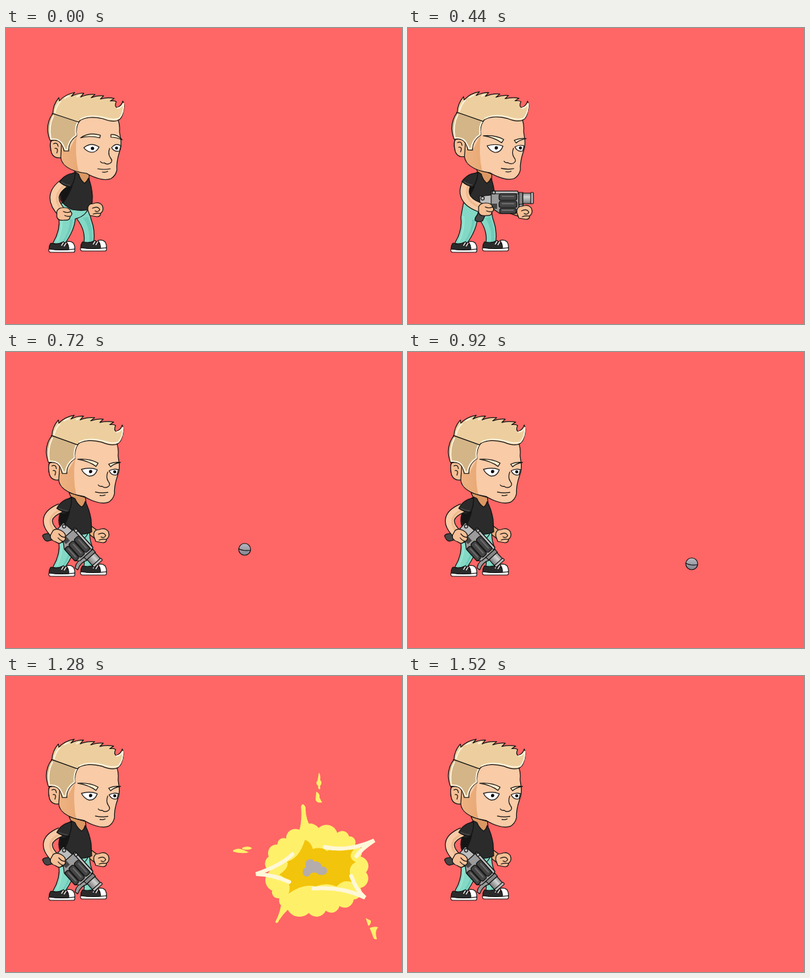
Recreate the animation shown at these times as an HTML page. Size 600 px wide and 450 px high, loop 1560 ms.

```html
<!DOCTYPE html>
<html lang="en">
<head>
<meta charset="utf-8">
<title>Launcher</title>
<style>
  html, body { margin: 0; width: 100%; height: 100%; overflow: hidden; background: #f66; }
  svg { display: block; width: 600px; height: 450px; }
  .ink { stroke: #111; stroke-width: 1.2; stroke-linejoin: round; stroke-linecap: round; }
  .line { fill: none; }
  .skin { fill: #f9cba7; }
  .hand { fill: #f6bf95; }
  .pants { fill: #83d9c6; }
  .cloth { fill: #2b2b2b; }
  .white { fill: #fff; }
  .steel { fill: #9b9b9b; }
  .light { fill: #bdbdbd; }
  .dark { fill: #454545; }
  .flame { fill: #fff06a; }
  .glow { fill: none; stroke: #fff3dc; stroke-width: 2; stroke-linejoin: round; }
</style>
</head>
<body>
<svg viewBox="0 0 600 450">
  <defs>
    <linearGradient id="cheek">
      <stop stop-color="#eeb282"/><stop offset="1" stop-color="#e8a975"/>
    </linearGradient>
    <linearGradient id="metal" x2="0" y2="1">
      <stop stop-color="#b9b9c2"/><stop offset="1" stop-color="#83838f"/>
    </linearGradient>
    <linearGradient id="tube" x2="0" y2="1">
      <stop stop-color="#8a8a8a"/><stop offset=".35" stop-color="#d2d2d2"/><stop offset="1" stop-color="#777"/>
    </linearGradient>
  </defs>

  <path id="smoke" class="white"/>

  <path id="farEdge" class="line" stroke="#111" stroke-width="13"/>
  <path id="farFill" class="line" stroke="#e9ad7e" stroke-width="10.6"/>

  <g id="legs">
    <path class="pants ink" d="M102 268H127Q126 284 130 294Q135 308 133 325Q126 329 118 327Q121 308 108 291Z"/>
    <path d="M124 287Q132 302 131 325L126 327Q128 305 117 289Z" fill="#70cbb9"/>
    <path class="pants ink" d="M84 266H127Q124 286 105 290Q104 307 89 328Q80 331 71 327Q83 307 80 288Z"/>
    <path d="M101 291Q101 306 87 327L83 328Q97 310 97 291Z" fill="#70cbb9"/>
    <path class="line" d="M84 286Q87 305 77 325" stroke="#9ce5d5" stroke-width="2"/>
    <g id="shoe">
      <path class="cloth ink" d="M68 327Q78 330 87 325L98 333L96 338H66Q64 332 68 327Z"/>
      <path class="white ink" d="M91 325Q98 323 102 327Q105 332 104 337L95 338Q96 330 91 325Z"/>
      <path class="white ink" d="M65 336Q84 339 104 336Q105 341 102 341H68Q64 341 65 336Z"/>
      <path class="line" d="M84 331L87 326M88 332L91 327" stroke="#fff" stroke-width="1.4"/>
    </g>
    <use href="#shoe" transform="translate(48 -2)"/>
  </g>

  <g id="torso">
    <path class="ink" fill="#dc9863" d="M102 212L126 222L126 231L118 238L106 224Z"/>
    <path class="cloth ink" d="M96 224L105 219L110 222Q113 232 119 236Q123 233 125 228Q130 240 131 256L130 275Q118 279 100 276Q88 270 83 262Q80 252 86 240Z"/>
    <path d="M86 242Q95 244 101 240Q95 256 87 266Q80 255 86 242Z" fill="#151515"/>
  </g>

  <g id="gun">
    <path class="dark ink" d="M-3 11L10 13L0 34Q-4 37 -11 34Q-13 31 -8 25Z"/>
    <path class="steel ink" d="M56 8L62 8Q57 18 63 29L58 30Q51 21 56 8Z"/>
    <path class="line ink" d="M9 15Q11 24 18 17" stroke-width="2"/>
    <path class="light ink" d="M-5 -3L12 -5L19 -8V17H9L-3 14Z"/>
    <path class="steel ink" d="M13 -11H53L55 -6V17L50 23H26L13 14Z"/>
    <path class="light ink" d="M13 -11H53L55 -7H13Z"/>
    <path class="dark" d="M13 8H22V16H13Z"/>
    <g class="dark ink">
      <rect x="25" y="-7" width="27" height="10" rx="3"/>
      <rect x="25" y="4" width="27" height="10" rx="3"/>
      <rect x="26" y="15" width="25" height="8" rx="3"/>
    </g>
    <path class="line" d="M29 -3H48M29 8H48M29 18H47" stroke="#6c6c6c" stroke-width="2"/>
    <rect class="ink" x="55" y="-9" width="6" height="18" fill="#858585"/>
    <rect class="ink" x="61" y="-8" width="13" height="16" fill="url(#tube)"/>
    <rect class="light ink" x="73" y="-9" width="4" height="17" rx="1"/>
    <g class="light ink"><circle r="2.6"/><circle cx="17" cy="-9" r="2.4"/></g>
  </g>

  <g id="farHand">
    <path class="hand ink" d="M-11 2Q-12 -8 -3 -8Q6 -12 11 -5Q14 3 8 7Q9 11 3 12L-8 10Z"/>
    <path class="line ink" d="M-4 -1Q4 -5 7 1Q5 6 0 3M8 7Q2 6 -3 8"/>
  </g>

  <path id="armEdge" class="line" stroke="#111" stroke-width="15"/>
  <path id="armFill" class="line" stroke="#f9cba7" stroke-width="12.6"/>
  <path id="armTone" class="line" stroke="#efb98d" stroke-width="3" transform="translate(3.5 1)"/>
  <g id="hand">
    <path class="hand ink" d="M-11 -3Q-9 -9 0 -9Q9 -9 10 -3Q14 1 9 5Q9 11 1 10Q-9 12 -11 5Z"/>
    <path class="line ink" d="M-1 -3Q5 0 10 -3M1 3Q5 5 9 4"/>
  </g>
  <g id="sleeve">
    <path class="cloth ink" d="M81 234Q87 225 96 222L105 220Q104 234 98 242Q89 241 81 234Z"/>
    <path class="line" d="M84 234Q91 239 97 239" stroke="#4a4a4a" stroke-width="1.5"/>
  </g>

  <g id="head">
    <path class="skin ink" d="M70 130L168 136Q173 145 172 158L174 170Q175 181 172 188Q167 204 168 216Q166 225 159 229Q151 232 141 229Q130 226 122 221Q103 219 92 211Q84 205 83 197Q72 198 69 189Q66 181 68 171Z"/>
    <path d="M107 164Q104 194 110 218Q96 215 88 207Q83 198 83 186L95 187Z" fill="url(#cheek)"/>
    <path class="hand ink" d="M83 197Q73 199 69 190Q65 173 70 171Q80 169 84 177Z"/>
    <path class="line ink" d="M72 176Q78 173 79 180M74 183Q80 182 77 190"/>
    <path class="ink" fill="#d3b588" d="M71 130Q63 140 63 155Q64 165 67 171Q81 168 85 177L88 187H95Q94 173 107 164Q105 151 111 142Z"/>
    <path class="glow" d="M72 133Q64 149 68 169Q82 167 87 179L90 185H93Q94 171 106 163Q104 150 109 143"/>
    <path class="ink" fill="#edcf9f" d="M71 130Q71 117 80 106L81 111Q89 101 104 98L99 104Q108 99 118 99L113 105Q123 100 135 101L129 106Q139 102 148 103L143 108Q154 105 164 107L158 111Q164 110 167 112Q164 119 168 121Q175 119 177 111Q181 118 177 130Q175 139 168 141Q159 143 147 138Q126 133 113 140L110 143Z"/>
    <path class="glow" d="M74 129Q76 118 83 111M88 107L96 103M107 105L112 102M168 122Q175 121 178 115Q179 128 172 137Q164 141 148 136Q126 131 112 139"/>
    <g id="calm">
      <path class="white ink" d="M118 182Q129 173 141 181Q137 189 130 189Q122 188 118 182Z"/>
      <path class="white ink" d="M160 182Q166 174 174 179L172 187Q164 189 160 182Z"/>
      <path class="ink" fill="#fff0cf" d="M113 167Q126 158 143 163L142 167Q127 163 113 167ZM159 162Q168 161 176 170Q167 166 159 166Z"/>
    </g>
    <g id="angry">
      <path class="white ink" d="M117 180Q130 176 141 180Q138 190 129 190Q121 188 117 180Z"/>
      <path class="white ink" d="M159 181Q166 177 173 179L171 187Q163 189 159 181Z"/>
      <path class="ink" fill="#fff0cf" d="M111 165Q129 163 142 170L139 175Q127 167 111 165ZM158 171Q166 167 176 168Q166 170 161 175Z"/>
    </g>
    <circle cx="131" cy="183" r="2.5"/><circle cx="167.5" cy="182.5" r="2.3"/>
    <path class="line ink" d="M157 183Q154 191 158 197Q163 203 157 206Q152 208 149 205Q145 206 143 203M139 214Q149 216 158 214M146 219Q150 220 154 218"/>
  </g>

  <g id="ball">
    <circle class="ink" r="9" fill="url(#metal)"/>
    <path class="line ink" d="M-9 -1Q-3 3 8.8 1.5"/>
  </g>

  <path id="scraps" class="flame"/>
  <g id="boom">
    <path id="cloud" class="flame"/>
    <path class="flame" d="M444 236Q449 220 447 198Q450 191 454 200Q453 216 464 235ZM418 338Q417 357 408 374Q411 378 414 371Q424 355 442 344Z"/>
    <path id="flecks" class="flame" d="M474 147Q477 150 476 158Q480 162 476 167V172Q472 173 473 167Q468 163 472 159ZM470 176Q476 178 475 185L479 192Q471 194 469 188ZM344 265Q352 260 361 265L368 268Q358 271 344 267ZM358 261Q368 257 373 262Q367 266 358 263ZM545 368Q549 370 553 372Q553 378 549 380ZM551 383Q558 380 564 382Q558 388 562 400Q557 402 555 393Z"/>
    <path fill="#f2c40b" d="M453 249Q462 252 465 263Q478 259 486 266Q503 259 527 264Q516 276 530 283Q514 291 526 314Q511 308 501 320Q485 313 469 320Q451 315 428 331Q435 313 414 302Q430 291 426 282Q444 278 453 249Z"/>
    <path class="line" stroke="#fff8d8" stroke-width="6" stroke-linecap="round" stroke-linejoin="bevel" d="M434 271Q417 288 379 301Q405 302 429 313M483 260Q518 268 558 250Q539 262 531 274M466 323Q510 320 544 337Q531 326 523 304"/>
    <path id="ash" fill="#b5adab" d="M454 285A7 7 0 0 1 467 282A10 10 0 0 1 479 290A6 6 0 1 1 482 302Q475 304 470 299Q462 298 460 303A6 6 0 0 1 450 297Q449 293 454 291Z"/>
  </g>
</svg>
<script>
const $ = id => document.getElementById(id);
const set = (id, name, value) => $(id).setAttribute(name, value);
const show = (id, on) => set(id, 'display', on ? 'inline' : 'none');
const part = (t, from, to) => Math.min(1, Math.max(0, (t - from) / (to - from)));
const ease = (t, from, to) => { const p = part(t, from, to); return p * p * (3 - 2 * p); };

// hx, turn: head; ex, ey: elbow; fx, fy: far hand; gx, gy, tilt: gun
const idle = { hx: 0, turn: 0, lean: 0, ex: 60, ey: 256, fx: 135, fy: 275, gx: 83, gy: 266, tilt: 0 };
const aim = { hx: 2, turn: 1, lean: 1, ex: 76, ey: 264, fx: 176, fy: 279, gx: 113, gy: 259, tilt: 0 };
const kick = { hx: -7, turn: .7, lean: -4, ex: 70, ey: 264, fx: 172, fy: 266, gx: 104, gy: 254, tilt: -8 };
const rest = { hx: -4, turn: 1.5, lean: -6, ex: 47, ey: 252, fx: 144, fy: 278, gx: 88, gy: 265, tilt: 48 };

function mix(a, b, p) {
  const out = {};
  for (const k in a) out[k] = a[k] + (b[k] - a[k]) * p;
  return out;
}

function poseAt(t) {
  const lift = ease(t, 200, 360), reach = Math.sin(Math.PI * lift);
  let pose = mix(idle, aim, lift);
  pose.ex -= 32 * reach;
  pose.gx -= 25 * reach;
  pose = mix(pose, kick, ease(t, 440, 540));
  return mix(pose, rest, ease(t, 570, 720));
}

// seeded noise in 0..1
const noise = n => { const v = Math.sin(n * 12.9898) * 43758.5453; return v - Math.floor(v); };

const disc = (x, y, r) => `M${x - r} ${y}a${r} ${r} 0 1 0 ${2 * r} 0a${r} ${r} 0 1 0 ${-2 * r} 0Z`;

function ring(cx, cy, rx, ry, count, size, seed) {
  let d = '';
  for (let i = 0; i < count; i++) {
    const a = (i + .5 * noise(seed + i)) * 2 * Math.PI / count;
    const far = .88 + .24 * noise(seed + i + 50);
    d += disc(cx + rx * far * Math.cos(a), cy + ry * far * Math.sin(a), size * (.45 + noise(seed + i + 90)));
  }
  return d;
}

// rounded lobes along a boxy oval
function lobes(cx, cy, rx, ry, count) {
  const box = v => Math.sign(v) * Math.abs(v) ** .8;
  let px, py, d = '';
  for (let i = 0; i <= count; i++) {
    const n = i % count, a = (n + .5 * noise(n + 7)) * 2 * Math.PI / count;
    const far = .92 + .14 * noise(n + 31);
    const x = cx + rx * far * box(Math.cos(a)), y = cy + ry * far * box(Math.sin(a));
    const r = i && Math.hypot(x - px, y - py) * .58;
    d += i ? `A${r} ${r} 0 0 1 ${x} ${y}` : `M${x} ${y}`;
    px = x; py = y;
  }
  return d + 'Z';
}
set('cloud', 'd', lobes(472, 295, 72, 62, 19));

function drawMan(t) {
  const { hx, turn, lean, ex, ey, fx, fy, gx, gy, tilt } = poseAt(t);
  set('head', 'transform', `translate(${hx} ${-Math.abs(hx) * .2}) rotate(${turn} 150 230)`);
  for (const id of ['torso', 'sleeve']) set(id, 'transform', `rotate(${lean} 115 275)`);

  const a = tilt * Math.PI / 180, c = Math.cos(a), s = Math.sin(a);
  const wx = gx + 5 * c - 16 * s, wy = gy + 5 * s + 16 * c;
  const arm = `M${88 + lean * .9} ${236 - lean * .2}Q${ex} ${ey} ${wx - 2} ${wy}`;
  for (const id of ['armEdge', 'armFill', 'armTone']) set(id, 'd', arm);
  set('hand', 'transform', `translate(${wx} ${wy}) rotate(${tilt * .6})`);
  for (const id of ['farEdge', 'farFill']) set(id, 'd', `M116 262L${fx - 3} ${fy + 3}`);
  set('farHand', 'transform', `translate(${fx} ${fy})`);
  set('gun', 'transform', `translate(${gx} ${gy}) rotate(${tilt})`);
  show('gun', t >= 320);
  show('calm', t < 280);
  show('angry', t >= 280);
}

function drawSmoke(t) {
  const p = part(t, 480, 680), r = 8 + 32 * Math.sqrt(p), size = 9 * (1 - p);
  show('smoke', p > 0 && p < 1);
  set('smoke', 'd', ring(202, 240, r, r * .8, 22, size, 3) + ring(198, 239, r * .65, r * .7, 14, size * .5, 20));
}

function drawBall(t) {
  const hop = (from, to, height) => { const p = part(t, from, to); return 4 * height * p * (1 - p); };
  const x = 180 + 117 * part(t, 480, 560) + 177 * (1 - (1 - part(t, 560, 1120)) ** 1.35);
  const y = 246 + 86 * part(t, 480, 600) ** 1.1 - hop(600, 840, 32) - hop(840, 1000, 10);
  show('ball', t > 480 && t < 1200);
  set('ball', 'transform', `translate(${x} ${y})`);
}

function drawBlast(t) {
  const size = Math.sin(part(t, 1160, 1400) * Math.PI), grow = 1 + ease(t, 1280, 1320);
  show('boom', t > 1160 && t < 1360);
  set('boom', 'transform', `translate(472 300) scale(${size}) translate(-472 -300)`);
  set('ash', 'transform', `translate(470 292) scale(${grow}) translate(-470 -292)`);
  show('flecks', t === 1280);
  show('ash', t >= 1280);

  const p = part(t, 1320, 1520), r = 60 + 45 * Math.sqrt(p);
  show('scraps', p > 0 && p < 1);
  set('scraps', 'd', ring(472, 305, r, r * .9, 19, 16 * (1 - p), 11));
}

function tick() {
  const t = Math.floor(performance.now() % 1560 / 40) * 40;
  for (const paint of [drawMan, drawSmoke, drawBall, drawBlast]) paint(t);
  requestAnimationFrame(tick);
}
tick();
</script>
</body>
</html>
```
